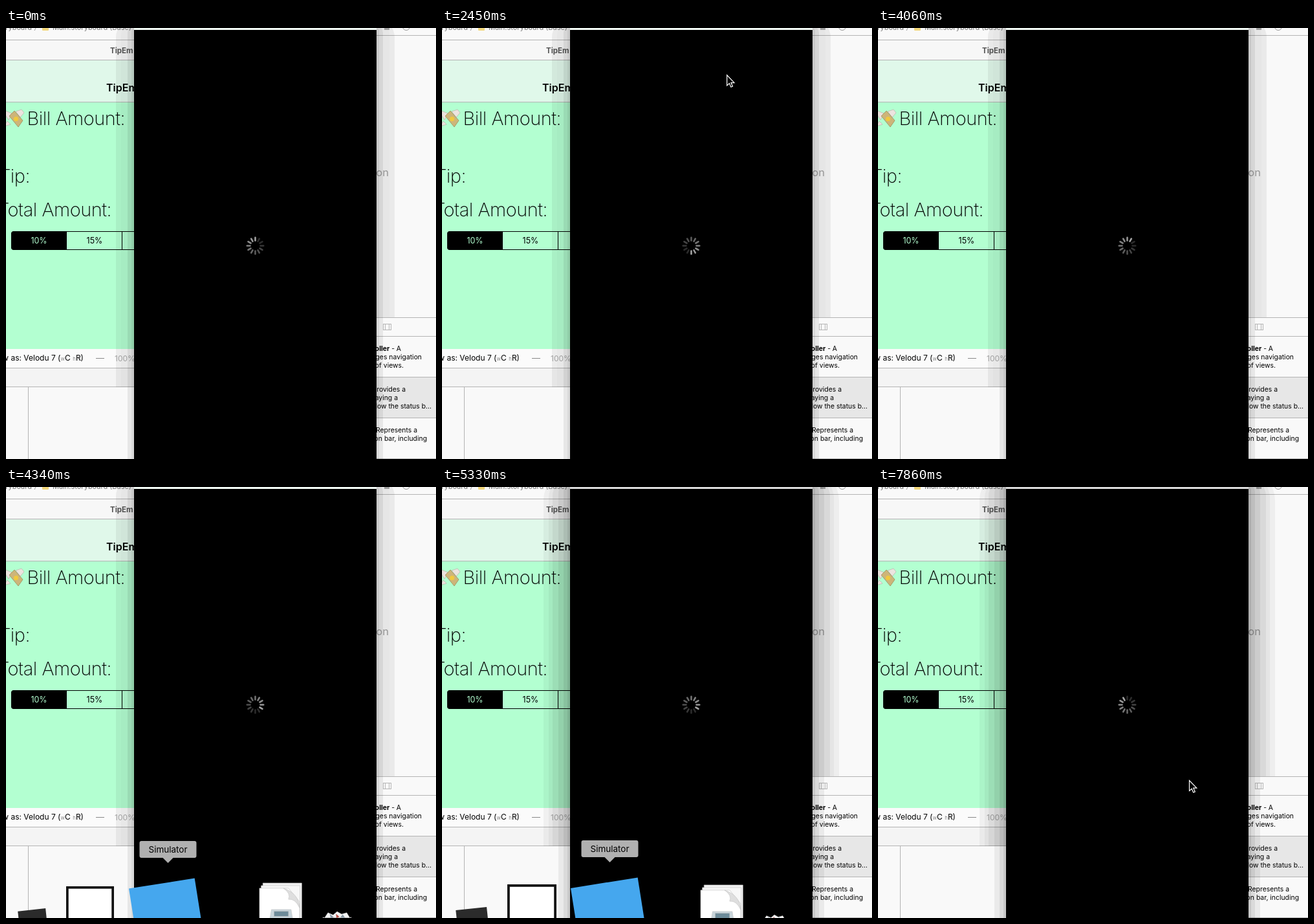
Write an HTML page that moves like this. It is 665 px wide and 666 px high and loops after 8 s.

```html
<!DOCTYPE html>
<html lang="en">
<head>
<meta charset="utf-8">
<title>Simulator launch</title>
<style>
html, body { margin: 0; width: 100%; height: 100%; overflow: hidden; background: #f9f9f9; }
svg { display: block; width: 665px; height: 666px; font-family: Inter, "Open Sans", sans-serif; }
.rule { stroke: #b4b4b4; fill: none; }
.big { font-size: 29px; font-weight: 200; letter-spacing: -.5px; text-anchor: end; }
.list { font-size: 10.4px; text-anchor: end; }
.b { font-weight: 700; }
.mid { text-anchor: middle; }
</style>
</head>
<body>
<svg viewBox="0 0 665 666">
  <defs>
    <clipPath id="upper"><path d="M0 0H665V447H573V555H0Z"/></clipPath>
  </defs>

  <!-- editor, left side -->
  <rect width="665" height="666" fill="#f9f9f9"/>
  <g font-size="11" fill="#777">
    <text x="40" y="2.5" text-anchor="end">Main.storyboard</text>
    <path d="M44 4l3-6" stroke="#999"/>
    <rect x="56" y="-6" width="10" height="10" rx="1" fill="#f2d77c"/>
    <text x="72" y="2.5">Main.storyboard (Base)</text>
  </g>
  <rect y="18" width="200" height="32" fill="#f7f7f7"/>
  <text class="b" x="161" y="39" font-size="11.5" fill="#555">TipEm</text>
  <rect y="50" width="200" height="65" fill="#e0f8ea"/>
  <text x="155" y="98" font-size="16" font-weight="600">TipEm</text>
  <rect y="115" width="200" height="381" fill="#b3ffd1"/>
  <path class="rule" d="M0 18.5H198M0 49.5H198M0 114.5H198"/>

  <g stroke-width=".6">
    <path d="M9 132L-3 127 0 136 4 142ZM15 129L24 126 28 131 22 138ZM7 149L-3 152 2 144Z" fill="#ece4df" stroke="#b9aaa2"/>
    <path d="M5 136L13 128 26 143 19 153Z" fill="#cdb57a" stroke="#8f7a45"/>
    <circle cx="15.5" cy="140.500" r="3.600" fill="#f0c93f"/>
  </g>
  <text class="big" x="184" y="150">Bill Amount:</text>
  <text class="big" x="37" y="239">Tip:</text>
  <text class="big" x="163" y="291">Total Amount:</text>

  <rect x="8.500" y="314.500" width="257" height="28" rx="4" fill="none" stroke="#000"/>
  <path d="M94 314H12a4 4 0 0 0-4 4v21a4 4 0 0 0 4 4H94Z"/>
  <path d="M179.500 314V343" stroke="#000"/>
  <g class="mid" font-size="12.500">
    <text x="51" y="333" fill="#b3ffd1">10%</text>
    <text x="137" y="333">15%</text>
  </g>

  <rect y="496" width="200" height="30" fill="#fbfbfb"/>
  <text x="120" y="514" font-size="12" text-anchor="end">View as: Velodu 7 (<tspan font-size="8" fill="#888">w</tspan>C <tspan font-size="8" fill="#888">h</tspan>R)</text>
  <path d="M139 510.500H152" stroke="#888"/>
  <text x="168" y="515" font-size="12" fill="#aaa">100%</text>
  <rect y="526" width="200" height="28" fill="#f4f4f4"/>
  <path class="rule" d="M0 525.500H198M0 554.500H198M34.500 555V666"/>

  <!-- inspector, right side -->
  <rect x="585" y="-8" width="8" height="11" fill="#aaa"/>
  <circle cx="619" cy="-2" r="5.500" fill="none" stroke="#999"/>
  <text x="592" y="229" font-size="16.500" fill="#a2a2a2" text-anchor="end">No Selection</text>
  <g fill="none" stroke="#b5b5b5">
    <rect x="583.500" y="457.500" width="12" height="9"/>
    <path d="M586.500 457V467M592.500 457V467"/>
  </g>
  <rect x="573" y="540" width="92" height="62" fill="#e7e7e7"/>
  <path class="rule" d="M573 11.500H665M573 447.500H665M573 476.500H665M573 539.500H665M573 602.500H665M573 665.500H665"/>
  <g class="list">
    <text x="611" y="499"><tspan class="b">Navigation Controller</tspan> - A</text>
    <text x="643" y="512">controller that manages navigation</text>
    <text x="615" y="525">through a hierarchy of views.</text>
    <text x="618" y="562">Provides a</text>
    <text x="606" y="575">mechanism for displaying a</text>
    <text x="658" y="588">navigation bar just below the status b...</text>
    <text x="636" y="625">Represents a</text>
    <text x="651" y="638">item on a navigation bar, including</text>
  </g>

  <!-- device window -->
  <g id="idle"></g>
  <g id="active"></g>
  <rect id="bar" x="198" width="375" height="3"/>
  <rect x="198" y="3" width="375" height="663"/>
  <g id="spin" transform="translate(385.500 336.500)" stroke="#fff" stroke-width="2.600" stroke-linecap="round"></g>

  <!-- dock -->
  <g id="dock">
    <g><rect y="6" width="98" height="120" fill="#2b2b2b" transform="rotate(-6)"/></g>
    <g><rect x="2.500" y="2.500" width="95" height="95" fill="#fff" stroke="#111" stroke-width="5"/></g>
    <g><rect y="15" width="99" height="99" fill="#45a7ee" transform="rotate(-9 0 15)"/></g>
    <g stroke="#c4c4c4">
      <path d="M8 0H99V110H8Z" fill="#f2f2f2"/>
      <path d="M4 6H95V110H4Z" fill="#f7f7f7"/>
      <path d="M0 12H68L94 44V110H0Z" fill="#fff"/>
      <path d="M56 12Q74 24 68 38Q84 36 94 58Q92 24 56 12Z" fill="#dedede"/>
      <path d="M28 62H74L82 110H20Z" fill="#c9d6dc"/>
      <path d="M34 66H68V78H34Z" fill="#6d8b99"/>
    </g>
    <g stroke="#bbb">
      <path d="M6 22L18 4 36 12 50 0 66 9 84 4 95 22Z" fill="#f4f4f4"/>
      <path d="M24 8L38 20 28 24ZM70 10L78 22 62 20Z" fill="#8a9ba8" stroke="none"/>
      <path d="M46 8L58 18 48 23Z" fill="#b8524a" stroke="none"/>
      <path d="M0 20Q50 38 100 20L86 110H14Z" fill="#dcdcdc"/>
      <path d="M22 30L32 110M50 32V110M78 30L68 110" stroke="#f6f6f6" stroke-width="4"/>
    </g>
  </g>
  <g id="tip">
    <path d="M-41 0H41a3 3 0 0 1 3 3V23a3 3 0 0 1-3 3H8L0 34-8 26H-41a3 3 0 0 1-3-3V3a3 3 0 0 1 3-3Z" fill="#b0b0b0"/>
    <text class="mid" y="18" font-size="13.500">Simulator</text>
  </g>
  <path id="cursor" d="M0 0V16L3.700 12.700 6.200 18.500 8.800 17.400 6.300 11.700H11.300Z" stroke="#fff" stroke-width="1.200"/>
</svg>

<script>
const LOOP = 8000;
const $ = id => document.getElementById(id);
const NS = "http://www.w3.org/2000/svg";

function add(parent, tag, attrs) {
  const el = document.createElementNS(NS, tag);
  for (const k in attrs) el.setAttribute(k, attrs[k]);
  return parent.appendChild(el);
}

// Stepped window shadow: [spread, opacity]; the wide bands stop at the lower panels
function shadow(group, wide, near) {
  const bands = (list, clip) => list.forEach(([s, a]) => {
    const g = add(group, "g", clip ? { "clip-path": "url(#upper)" } : {});
    add(g, "rect", { x: 198 - s, y: 3 - s * .6, width: 375 + 2 * s, height: 760, rx: s, opacity: a });
  });
  bands(wide, true);
  bands(near, false);
}
shadow($("idle"), [[28, .06], [20, .015]], [[10, .07], [4, .06]]);
shadow($("active"), [[41, .045], [33, .04], [27, .05]], [[18, .06], [10, .07], [4, .08]]);

const spokes = Array.from({ length: 12 }, (_, i) =>
  add($("spin"), "path", { d: "M0-8V-12.700", transform: `rotate(${i * 30})` }));

// Screen refresh times: first, last, count
const ticks = [
  [0, 0, 1], [150, 1100, 7], [1250, 2150, 7], [2300, 3340, 8], [3480, 3630, 2],
  [3880, 4060, 2], [4340, 4340, 1], [4550, 4990, 3], [5330, 5330, 1],
  [5470, 6240, 5], [6390, 6530, 2], [6770, 7200, 2], [7570, 7860, 3]
].flatMap(([a, b, n]) => Array.from({ length: n }, (_, i) => n > 1 ? a + (b - a) * i / (n - 1) : a));

// Dock icons as x, y, width
const onSim = [18, 653, 44, 93, 617, 74, 190, 605, 104, 392, 612, 66, 490, 656, 44];
const onSimRight = [21, 651, 49, 101, 614, 76, 199, 604, 106, 400, 615, 66, 495, 661, 38];
const onStack = [-10, 670, 40, 70, 628, 67, 156, 607, 104, 359, 601, 72, 466, 640, 54];
const move = (pose, dx, dy) => pose.map((v, i) => v + [dx, dy, 0][i % 3]);

const dockTrack = [
  [0, move(onSim, -24, 80)], [3880, move(onSim, -24, 80)], [4060, move(onSim, -24, 10)],
  [4340, onSim], [4990, onSimRight], [6240, onSimRight], [6530, onStack],
  [6770, move(onStack, 0, 80)]
];
const cursorTrack = [
  [0, [443, -30]], [2200, [443, -30]], [2300, [443, 20]], [2750, [436, 180]],
  [3340, [400, 530]], [3480, [375, 670]], [6390, [350, 670]], [6530, [405, 659]],
  [6770, [554, 541]], [7200, [481.500, 453.500]]
];

function at(track, t) {
  const i = track.findLastIndex(k => k[0] <= t);
  const [t0, a] = track[i];
  if (i === track.length - 1) return a;
  const [t1, b] = track[i + 1];
  const p = (t - t0) / (t1 - t0);
  return a.map((v, j) => v + (b[j] - v) * p);
}

const show = (el, on) => el.setAttribute("visibility", on ? "visible" : "hidden");
const place = (el, x, y, scale = 1) =>
  el.setAttribute("transform", `translate(${x} ${y}) scale(${scale})`);

function draw(time) {
  const t = ticks.findLast(v => v <= time);

  const head = Math.floor(t * .012 + .7);
  spokes.forEach((s, i) => {
    const age = (head - i + 120) % 12;
    s.setAttribute("opacity", .64 - Math.min(age, 10) * .047);
  });

  const focused = t >= 5330;
  show($("idle"), !focused);
  show($("active"), focused);
  $("bar").setAttribute("fill", focused ? "#d8d8d8" : "#f0f8f3");

  const dock = at(dockTrack, t);
  [...$("dock").children].forEach((icon, i) =>
    place(icon, dock[i * 3], dock[i * 3 + 1], dock[i * 3 + 2] / 100));
  show($("tip"), t >= 4340 && t < 6390);
  place($("tip"), dock[6] + 60.500, dock[7] - 58);
  place($("cursor"), ...at(cursorTrack, t));
}

const start = performance.now();
function frame() {
  draw((performance.now() - start) % LOOP);
  requestAnimationFrame(frame);
}
frame();
</script>
</body>
</html>
```
